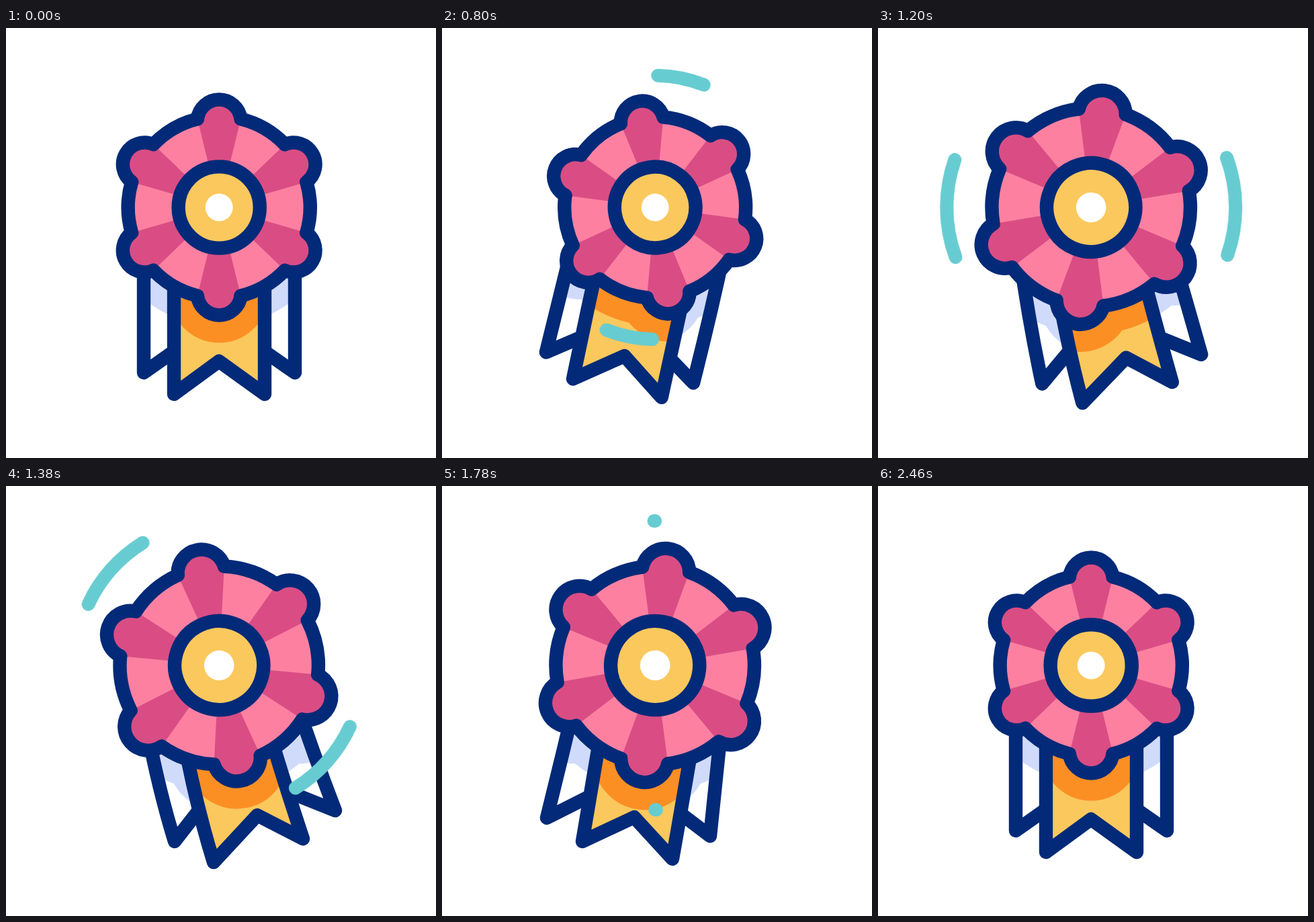
Animation of 640 by 640 pixels, one loop 3000 ms. Source, as an HTML page without scripts:

```html
<!DOCTYPE html>
<html lang="en">
<head>
<meta charset="utf-8">
<title>Rosette</title>
<style>
@property --a { syntax: "<angle>"; inherits: true; initial-value: 0deg; }
@property --s { syntax: "<number>"; inherits: true; initial-value: 1; }
@property --head { syntax: "<length>"; inherits: true; initial-value: 0px; }
@property --tail { syntax: "<length>"; inherits: true; initial-value: 0px; }

html, body { margin: 0; width: 100%; height: 100%; overflow: hidden; background: #fff; }
svg {
  display: block; width: 100%; height: 100%;
  --ease: cubic-bezier(.333, 0, .667, 1);
  animation: turn 3s var(--ease) infinite, pulse 3s var(--ease) infinite,
    head 3s var(--ease) infinite, tail 3s var(--ease) infinite;
}

/* rosette: line weight stays constant while the shape scales */
.spin { transform: translate(317.2px, 267px) rotate(var(--a)) scale(var(--s)); }
.grow { transform: translate(317.2px, 267px) scale(var(--s)); }
.line { fill: none; stroke: #032a78; stroke-width: 20.4px; stroke-linecap: round; stroke-linejoin: round; }
.spin .line { stroke-width: calc(20.4px / var(--s)); }
.spin .hub { fill: #fbc85d; }
.shade { fill: none; stroke-width: calc(82px / var(--s)); stroke-linecap: round; stroke-linejoin: round; }

@keyframes turn {
  0%, 6.667% { --a: 0deg; }
  20% { --a: -21deg; }
  66.667% { --a: 201deg; }
  82%, 100% { --a: 180deg; }
}
@keyframes pulse {
  0%, 6.667% { --s: 1; }
  20% { --s: .9; }
  33.333%, 66.667% { --s: 1.09; }
  82%, 100% { --s: 1; }
}

/* swooshes */
.swoosh {
  fill: none; stroke: #67ccd1; stroke-linecap: round;
  stroke-width: calc(20px / var(--s));
  stroke-dasharray: calc(var(--head) - var(--tail) + .01px) 400px;
  stroke-dashoffset: calc(0px - var(--tail));
  animation: show 3s step-end infinite;
}
@keyframes head { 0%, 18.57% { --head: 0px; } 56.1%, 100% { --head: 180px; } }
@keyframes tail { 0%, 25% { --tail: 0px; } 60.4%, 100% { --tail: 180px; } }
@keyframes show { 0% { opacity: 0; } 20% { opacity: 1; } 60.5%, 100% { opacity: 0; } }

/* ribbons */
.front { animation: front 3s infinite; d: path("M250 340Q250 442 250 545L317 496L385 545Q385 442 385 340Z"); }
.back { animation: back 3s infinite; d: path("M205 300Q205 406 205 513L317 434L430 513Q430 406 430 300Z"); }

@keyframes front {
  0%, 6.667% {
    d: path("M250 340Q250 442 250 545L317 496L385 545Q385 442 385 340Z");
    animation-timing-function: cubic-bezier(.4, 0, .8, .75);
  }
  16.667% {
    d: path("M243 340Q226 436 210 531L286 493L345 554Q362 447 379 340Z");
    animation-timing-function: cubic-bezier(.3, .5, .6, 1);
  }
  22.667% {
    d: path("M232 318Q203 417 175 516L254 487L306 553Q334 455 363 356Z");
    animation-timing-function: cubic-bezier(.4, 0, .7, .8);
  }
  34.667% {
    d: path("M265 340Q274 445 287 551L352 493L422 535Q412 440 399 340Z");
    animation-timing-function: cubic-bezier(.25, .7, .6, 1);
  }
  46% {
    d: path("M258 340Q278 460 309 560L374 490L442 525Q412 435 384 340Z");
    animation-timing-function: cubic-bezier(.35, 0, .65, 1);
  }
  59.333% {
    d: path("M241 340Q225 435 209 529L286 493L343 555Q362 448 380 340Z");
    animation-timing-function: cubic-bezier(.35, 0, .7, .8);
  }
  70% {
    d: path("M248 340Q246 442 244 543L313 496L380 547Q382 444 385 340Z");
    animation-timing-function: cubic-bezier(.3, .5, .6, 1);
  }
  82%, 100% { d: path("M250 340Q250 442 250 545L317 496L385 545Q385 442 385 340Z"); }
}
@keyframes back {
  0%, 6.667% {
    d: path("M205 300Q205 406 205 513L317 434L430 513Q430 406 430 300Z");
    animation-timing-function: cubic-bezier(.4, 0, .8, .75);
  }
  16.667% {
    d: path("M200 295Q184 396 168 497L286 430L393 526Q410 413 427 300Z");
    animation-timing-function: cubic-bezier(.3, .5, .6, 1);
  }
  22.667% {
    d: path("M200 268Q170 370 141 472L271 427L358 535Q387 433 417 330Z");
    animation-timing-function: cubic-bezier(.4, 0, .7, .8);
  }
  34.667% {
    d: path("M228 330Q227 430 219 531L317 441L448 497Q456 410 441 310Z");
    animation-timing-function: cubic-bezier(.25, .7, .6, 1);
  }
  46% {
    d: path("M206 340Q225 445 251 529L335 421L490 483Q458 400 428 310Z");
    animation-timing-function: cubic-bezier(.35, 0, .65, 1);
  }
  59.333% {
    d: path("M203 300Q180 397 156 494L281 431L399 521Q411 410 422 300Z");
    animation-timing-function: cubic-bezier(.35, 0, .7, .8);
  }
  70% {
    d: path("M208 300Q197 404 186 509L311 432L420 514Q425 407 431 300Z");
    animation-timing-function: cubic-bezier(.3, .5, .6, 1);
  }
  82%, 100% { d: path("M205 300Q205 406 205 513L317 434L430 513Q430 406 430 300Z"); }
}
</style>
</head>
<body>
<svg viewBox="0 0 640 640">
  <defs>
    <path id="petal" d="M0 0L-32.3 -131.6A32.5 32.5 0 0 1 32.3 -131.6Z"/>
    <path id="edge" d="M-32.3 -131.6A32.5 32.5 0 0 1 32.3 -131.6A135.5 135.5 0 0 1 97.8 -93.8"/>
    <g id="petals">
      <use href="#petal"/>
      <use href="#petal" transform="rotate(60)"/>
      <use href="#petal" transform="rotate(120)"/>
      <use href="#petal" transform="rotate(180)"/>
      <use href="#petal" transform="rotate(240)"/>
      <use href="#petal" transform="rotate(300)"/>
    </g>
    <g id="rim">
      <use href="#edge"/>
      <use href="#edge" transform="rotate(60)"/>
      <use href="#edge" transform="rotate(120)"/>
      <use href="#edge" transform="rotate(180)"/>
      <use href="#edge" transform="rotate(240)"/>
      <use href="#edge" transform="rotate(300)"/>
    </g>
    <clipPath id="inBack"><path class="back"/></clipPath>
    <clipPath id="inFront"><path class="front"/></clipPath>
  </defs>

  <!-- the rear shade grows but does not turn -->
  <path class="back" fill="#fff"/>
  <g clip-path="url(#inBack)">
    <g class="grow"><g class="shade" stroke="#d0dbfb"><use href="#rim"/></g></g>
  </g>
  <path class="back line"/>

  <path class="front" fill="#fbc85d"/>
  <g clip-path="url(#inFront)">
    <g class="spin"><g class="shade" stroke="#fc8f24"><use href="#rim"/></g></g>
  </g>
  <path class="front line"/>

  <g class="spin">
    <circle r="135.5" fill="#fd80a1"/>
    <use href="#petals" fill="#d94d84"/>
    <g class="line"><use href="#rim"/></g>
    <circle class="line hub" r="60.6"/>
    <circle r="20.5" fill="#fff"/>
  </g>

  <g class="grow swoosh">
    <path id="arc" pathLength="180" d="M0 -197.2A197.2 197.2 0 0 1 0 197.2"/>
    <use href="#arc" transform="rotate(180)"/>
  </g>
</svg>
</body>
</html>
```
